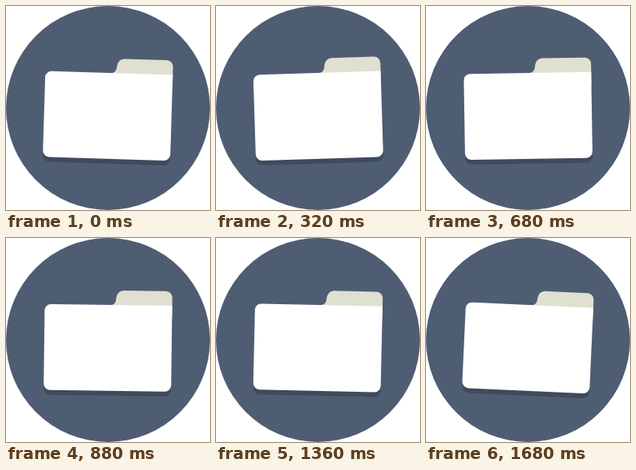
These frames come from a looping animation (256 px wide and 256 px high, 1720 ms). An HTML page with a canvas:

```html
<!DOCTYPE html>
<html lang="en">
<head>
<meta charset="utf-8">
<title>Swinging folder</title>
<style>
html, body { margin: 0; width: 100%; height: 100%; overflow: hidden; background: #fff; }
canvas { display: block; width: 256px; height: 256px; }
</style>
</head>
<body>
<canvas id="stage" width="256" height="256"></canvas>
<script>
const ctx = document.getElementById('stage').getContext('2d');
const LOOP = 1720;
const STEP = 40;

// Cosine ease from 0 to 1 between two times.
function ease(t, from, to) {
  const u = Math.min(1, Math.max(0, (t - from) / (to - from)));
  return (1 - Math.cos(Math.PI * u)) / 2;
}

// Degrees: swing left, swing back, settle, rest, lean right.
function angleAt(t) {
  return 2
    - 4.2 * ease(t, -80, 420)
    + 3.6 * ease(t, 420, 1060)
    - 0.15 * ease(t, 1060, 1240)
    + 1.35 * ease(t, 1320, 1680);
}

function panel(y, color) {
  ctx.fillStyle = color;
  ctx.beginPath();
  ctx.roundRect(48, y, 160, 107.8, [8, 0, 8, 8]);
  ctx.fill();
}

function tab(color) {
  ctx.fillStyle = color;
  ctx.beginPath();
  ctx.moveTo(128, 84.5);
  ctx.bezierCurveTo(134.5, 84.5, 137, 81.5, 137.5, 76.5);
  ctx.bezierCurveTo(138.3, 69.5, 141.5, 65.8, 147.5, 65.8);
  ctx.lineTo(208, 100);
  ctx.lineTo(128, 100);
  ctx.fill();
  ctx.beginPath();
  ctx.roundRect(147, 65.8, 61, 34, [0, 8, 0, 0]);
  ctx.fill();
}

function draw(t) {
  ctx.clearRect(0, 0, 256, 256);
  ctx.fillStyle = '#4f5d73';
  ctx.beginPath();
  ctx.arc(128, 128, 128, 0, Math.PI * 2);
  ctx.fill();

  ctx.save();
  ctx.translate(128, 128);
  ctx.rotate(angleAt(t) * Math.PI / 180);
  ctx.translate(-128, -128);
  panel(90, '#3f4a5c');
  tab('#e0e0d1');
  panel(84, '#fff');
  ctx.restore();
}

const start = performance.now();
function tick() {
  const t = (performance.now() - start) % LOOP;
  draw(Math.floor(t / STEP) * STEP);
  requestAnimationFrame(tick);
}
tick();
</script>
</body>
</html>
```
